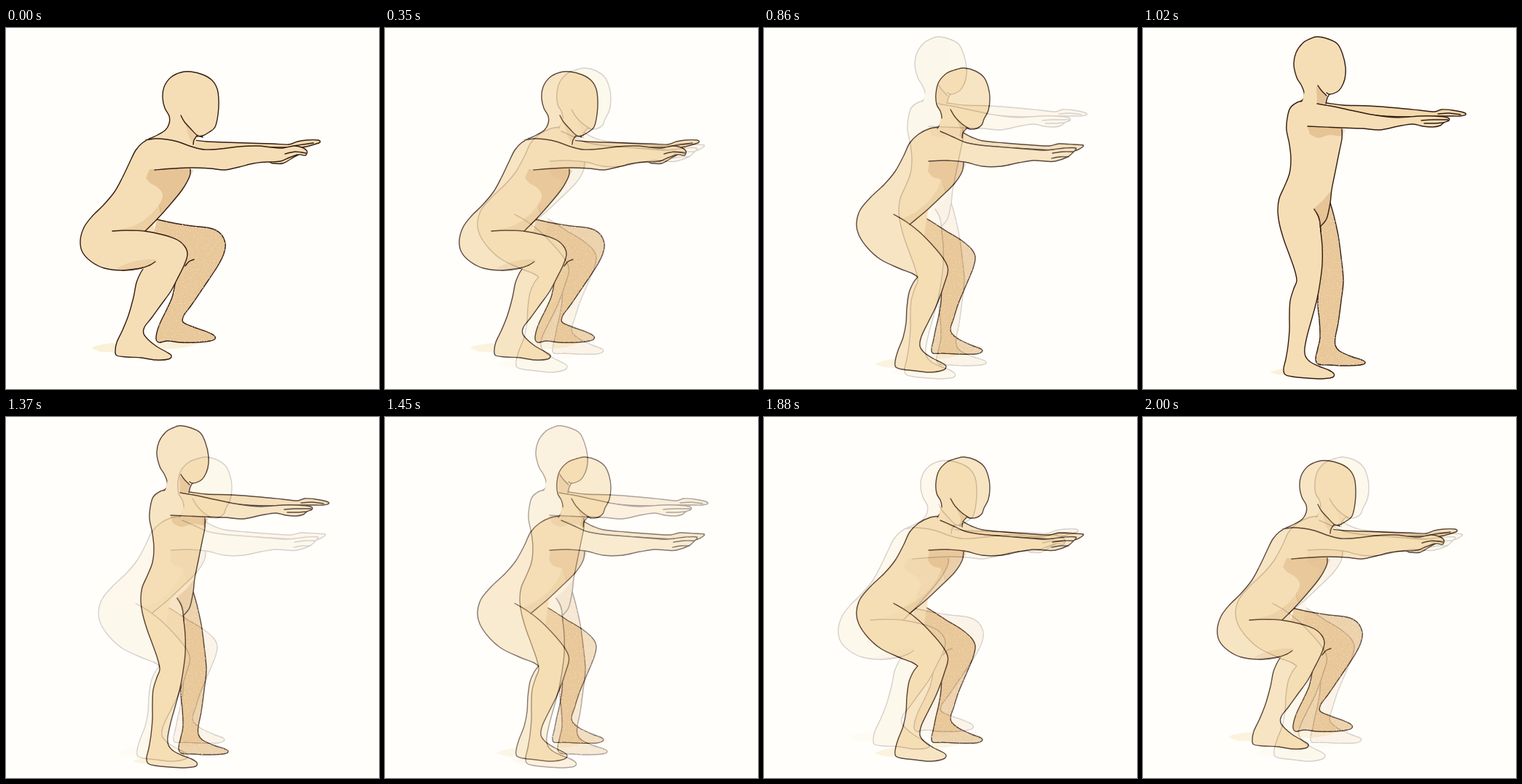
An HTML page for the animation above (2040 ms loop, 512x496 px).

```html
<!DOCTYPE html>
<html lang="en">
<head>
<meta charset="utf-8">
<title>Squat</title>
<style>
  html, body { margin: 0; width: 100%; height: 100%; overflow: hidden; background: #fffefa; }
  svg.pose { position: absolute; left: 0; top: 0; width: 512px; height: 496px; background: #fffefa; }
  .pose * { stroke-linecap: round; stroke-linejoin: round; }
  .line, .body, .far { stroke: #331c12; stroke-width: 1.4; }
  .line { fill: none; }
  .body, .skin { fill: #f5deb5; }
  .far { fill: #e8c799; }
  .farArm { fill: #f2d8ab; }
  .shade { fill: #c7915d; fill-opacity: .34; }
  .pale { fill: #c7915d; fill-opacity: .2; }
  .ground { fill: #faf0d8; }
  .grain { fill: #f2dab3; filter: url(#grain); }

  /* jump-both gives the fades .2 .4 .6 .8 at 40 ms each */
  .half { animation: half 2040ms steps(4, jump-both) infinite; }
  .tall { animation: tall 2040ms steps(4, jump-both) infinite; }
  @keyframes half {
    0%, 17.156% { opacity: 0; }
    25%, 92.156% { opacity: 1; }
    100% { opacity: 0; }
  }
  @keyframes tall {
    0%, 42.156% { opacity: 0; }
    50%, 67.156% { opacity: 1; }
    75%, 100% { opacity: 0; }
  }
</style>
</head>
<body>
<svg width="0" height="0" style="position:absolute">
  <filter id="grain" color-interpolation-filters="sRGB">
    <feTurbulence type="fractalNoise" baseFrequency=".6" numOctaves="2" seed="4"/>
    <feColorMatrix values="0 0 0 0 0  0 0 0 0 0  0 0 0 0 0  0 0 0 6 -3.5"/>
    <feComposite in="SourceGraphic" operator="in"/>
  </filter>
</svg>

<!-- deep squat -->
<svg class="pose deep" viewBox="0 0 512 496">
  <polyline class="ground" points="117,440 126,436 152,433 150,444 130,445"/>
  <polyline class="ground" points="205,433 235,432 264,432 250,438 224,441 210,438"/>
  <polyline class="far farArm" points="258,154 275,156 300,157 330,158 365,159 388,160 400,156 413,154 428,154 431,157 423,160 406,164 385,164 330,164 275,168 258,166"/>
  <polyline class="line" points="395,162 408,160 422,158"/>
  <polyline class="far leg" points="207,263 230,268 255,272 280,275 294,282 301,296 299,310 290,328 272,355 255,380 244,395 243,404 255,410 272,416 285,422 287,427 280,430 260,432 240,432 222,430 210,432 206,427 208,415 213,402 220,388 228,370 232,352 234,338 222,310 200,292"/>
  <polygon class="skin" points="224,130 262,149 253,194 250,206 225,243 207,263 191,279 205,321 150,260 190,158 207,149 219,140"/>
  <polyline class="body" points="197,152 187,158 178,168 170,184 160,205 149,225 134,243 118,259 107,274 102,292 105,308 117,321 135,330 160,333 185,330 205,321"/>
  <polyline class="skin" points="253,194 252,204 242,222 225,243 207,263 191,279"/>
  <polyline class="body" points="146,279 165,278 190,279 215,284 235,291 246,301 249,312 244,327 235,345 226,362 213,380 200,398 190,411 189,420 195,428 206,437 220,445 227,450 223,455 205,456 185,453 165,452 152,450 150,444 152,432 160,415 168,395 175,370 179,350 185,336 190,329"/>
  <polyline class="skin" points="188,328 205,319 225,318 215,338 190,345"/>
  <polyline class="line" points="160,333 185,330 197,326 205,321"/>
  <polyline class="line" points="246,327 251,321 258,318"/>
  <polyline class="shade" points="197,194 253,194 252,204 242,222 225,243 214,255 210,244 213,238 215,228 208,219 198,213 192,206"/>
  <polyline class="pale" points="211,242 214,255 207,263 191,279 172,278 152,278 172,273 188,265 201,254"/>
  <polyline class="pale" points="149,332 165,324 185,319 205,318 203,322 185,330 165,333"/>
  <polyline class="line" points="253,194 252,204 242,222 225,243 207,263 191,279"/>
  <polyline class="body" points="197,152 208,147 219,140 224,131 224,121 218,110 215,96 217,81 226,68 240,61 254,60 270,64 283,72 290,84 292,100 291,119 287,136 279,143 270,148 262,149"/>
  <polygon class="skin" points="215,146 262,149 257,160 250,164 205,160"/>
  <polygon class="pale" points="246,131 254,140 262,148 258,160 251,150"/>
  <polyline class="line" points="240,120 245,129 254,139 262,147 270,150"/>
  <polyline class="line" points="262,148 258,154 257,160"/>
  <polyline class="body" points="192,154 205,152 220,153 235,156 255,163 272,167 295,166 320,163 345,162 365,164 380,165 395,162 406,164 413,169 411,175 402,174 391,180 380,186 366,186 360,184 340,186 320,191 300,195 280,193 255,192 230,193 204,195"/>
  <polyline class="line" points="383,173 397,170 412,172"/>
  <polyline class="line" points="363,184 377,183 389,178 400,174"/>
</svg>

<!-- half squat -->
<svg class="pose half" viewBox="0 0 512 496">
  <polyline class="ground" points="152,462 165,457 184,455 180,466 165,466"/>
  <polyline class="ground" points="228,449 268,448 250,454 232,454"/>
  <polyline class="far farArm" points="272,143 285,150 300,155 330,158 370,161 392,162 405,159 425,160 438,161 435,165 424,169 395,168 345,165 300,162 272,157"/>
  <polyline class="far leg" points="212,256 230,266 250,279 270,291 285,304 290,315 287,330 278,352 267,378 260,400 256,412 258,420 268,428 285,436 298,441 299,445 290,448 265,448 245,447 232,447 230,441 233,427 236,412 240,395 243,375 243,356 236,325 202,280"/>
  <polygon class="skin" points="243,122 274,138 272,153 274,184 270,200 245,230 213,260 200,271 211,342 150,280 200,160 214,147 240,137"/>
  <polyline class="body" points="243,136 228,138 212,146 200,158 192,175 180,197 165,215 147,232 132,250 127,268 130,284 142,302 160,318 185,330 203,337 211,342"/>
  <polyline class="skin" points="274,184 272,197 262,213 245,230 225,249 212,260 200,270"/>
  <polyline class="body" points="211,342 205,350 199,364 196,385 195,405 191,425 184,443 180,458 181,466 190,469 207,471 228,473 246,470 250,465 246,461 232,454 220,446 214,437 216,424 225,405 235,385 243,365 248,350 252,337 252,328 245,315 230,297 212,279 195,266 178,256"/>
  <polyline class="shade" points="227,184 274,184 272,197 262,213 250,226 246,216 242,208 232,205 225,197"/>
  <polyline class="pale" points="243,209 249,226 225,249 212,260 200,269 190,263 208,253 226,238 238,222"/>
  <polyline class="line" points="274,184 272,197 262,213 245,230 225,249 212,260 200,270"/>
  <polyline class="body" points="238,138 243,130 244,122 242,114 237,105 236,90 240,74 251,62 264,57 275,55 290,59 302,68 308,82 310,97 308,113 302,125 299,133 292,138 283,139 277,137"/>
  <polygon class="skin" points="240,137 243,124 278,137 272,146 272,156 245,146"/>
  <polygon class="shade" points="264,125 272,133 278,138 272,146 272,152 268,149 270,139"/>
  <polyline class="line" points="256,112 262,122 272,132 283,139"/>
  <polyline class="line" points="278,138 273,144 272,151"/>
  <polyline class="body" points="242,142 258,149 276,157 297,161 320,163 345,165 370,167 385,168 397,167 412,165 428,165 424,171 417,177 400,183 386,183 370,182 350,185 325,190 300,190 275,184 250,182 226,183"/>
  <polyline class="line" points="396,172 410,170 425,170"/>
  <polyline class="line" points="395,179 406,177 418,177"/>
</svg>

<!-- standing -->
<svg class="pose tall" viewBox="0 0 512 496">
  <polyline class="ground" points="174,473 184,470 195,468 195,476 184,476"/>
  <polyline class="far farArm" points="252,103 275,106 310,107 350,110 380,113 400,115 410,112 425,113 440,116 443,119 435,121 420,121 405,121 380,122 320,120 255,108"/>
  <polyline class="line" points="405,118 420,117 436,119"/>
  <polyline class="far leg" points="257,240 262,258 268,285 272,315 275,347 272,375 268,405 264,425 264,436 270,444 285,451 300,456 305,460 298,463 275,464 255,463 241,462 237,455 240,440 243,425 242,400 240,372 243,273"/>
  <polygon class="skin" points="221,96 252,92 252,104 273,139 272,155 259,222 257,240 252,262 243,273 215,300 190,255 203,190 199,125 212,102"/>
  <polyline class="body" points="224,99 212,102 202,110 198,124 197,140 201,160 203,180 201,200 194,218 187,234 185,250 187,268 193,290 201,312 208,332 211,347 207,358 202,375 201,395 201,415 199,437 196,455 193,468 195,476 205,479 225,481 245,482 260,480 262,475 255,470 242,465 230,459 223,451 222,440 226,420 233,395 239,372 243,350 246,325 246,300 244,280 242,262 235,249"/>
  <polyline class="skin" points="273,139 273,152 269,172 264,197 259,222 257,240 252,262 243,273"/>
  <polyline class="line" points="244,280 243,268 240,257 235,249"/>
  <polyline class="shade" points="226,136 273,138 272,148 256,147 241,151 229,146"/>
  <polyline class="shade" points="259,222 257,240 252,262 244,272 241,258 235,249 247,237"/>
  <polyline class="line" points="273,139 273,152 269,172 264,197 259,222 257,240 252,262 243,273"/>
  <polyline class="body" points="217,101 221,96 221,88 217,78 211,68 207,50 210,34 219,21 229,15 239,12 254,15 267,22 274,36 278,54 277,70 272,82 266,88 256,91 252,89"/>
  <polygon class="skin" points="219,101 222,86 252,90 252,106 225,106"/>
  <polygon class="shade" points="238,80 246,87 253,93 252,104 239,103"/>
  <polyline class="line" points="240,79 245,86 252,93"/>
  <polyline class="line" points="256,91 253,96 251,104"/>
  <polyline class="body" points="239,104 262,108 290,114 320,120 350,123 380,121 400,121 418,123 420,127 413,130 408,134 398,136 384,135 370,132 350,135 325,140 300,138 270,137 226,135"/>
  <polyline class="line" points="382,127 398,126 419,126"/>
  <polyline class="line" points="386,131 400,131 413,130"/>
</svg>

<script>
  // Catmull-Rom spline through the points, as cubic segments
  function spline(pts) {
    const at = i => pts[Math.max(0, Math.min(pts.length - 1, i))];
    let d = `M${pts[0]}`;
    for (let i = 0; i < pts.length - 1; i++) {
      const [a, b, c, e] = [at(i - 1), at(i), at(i + 1), at(i + 2)];
      const out = b.map((v, k) => v + (c[k] - a[k]) / 6);
      const into = c.map((v, k) => v - (e[k] - b[k]) / 6);
      d += `C${out} ${into} ${c}`;
    }
    return d;
  }

  function addGrain(path) {
    const grain = path.cloneNode();
    grain.setAttribute('class', 'grain');
    path.after(grain);
  }

  for (const line of document.querySelectorAll('polyline')) {
    const pts = line.getAttribute('points').split(' ').map(p => p.split(',').map(Number));
    const path = document.createElementNS('http://www.w3.org/2000/svg', 'path');
    path.setAttribute('class', line.getAttribute('class'));
    path.setAttribute('d', spline(pts));
    line.replaceWith(path);
    if (path.classList.contains('leg')) addGrain(path);
  }
</script>
</body>
</html>
```
